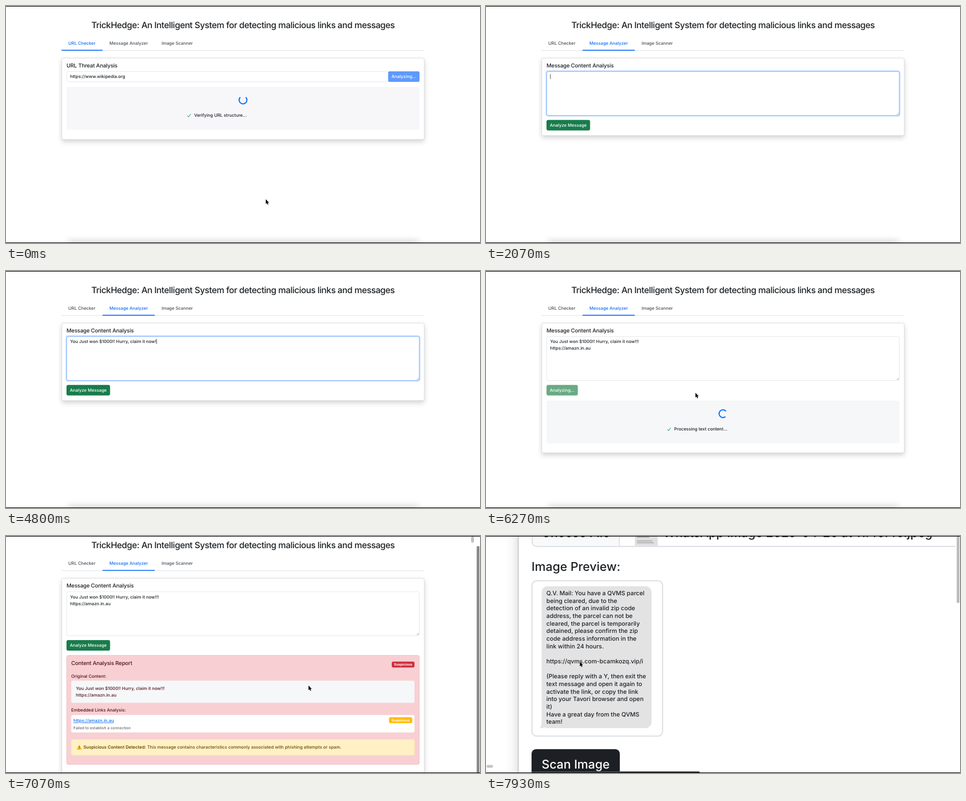
An HTML page that plays this animation: 854 px wide and 428 px high, repeating every 8000 ms.

```html
<!DOCTYPE html>
<html lang="en">
<head>
<meta charset="utf-8">
<title>Threat analysis demo</title>
<style>
  html, body { margin: 0; width: 100%; height: 100%; overflow: hidden; background: #fff; }
  svg { display: block; }
  text { font-family: Inter, Roboto, sans-serif; white-space: pre; text-rendering: geometricPrecision; }
  .card { fill: #fff; stroke: #cfcfcf; stroke-width: .7; filter: drop-shadow(0 4px 4px rgba(0, 0, 0, .17)); }
  .field { fill: #fff; stroke: #dee2e6; stroke-width: .8; }
  .glow { fill: none; stroke: #c2daff; stroke-width: 2.4; }
  .haze { opacity: .15; filter: blur(6px); }
</style>
</head>
<body>
<svg id="stage" width="854" height="428" viewBox="0 0 854 428"></svg>
<script>
const LOOP = 8000, SPIN = 596;
const INK = '#1c2024', BLUE = '#0d6efd', GREEN = '#187c4b', WINE = '#4d1218';
const T_MESSAGE = 2070, T_ANALYZE = 6000, T_REPORT = 6600, T_IMAGE = 7330;

const stage = document.getElementById('stage');

function el(parent, tag, attrs = {}) {
  const node = document.createElementNS('http://www.w3.org/2000/svg', tag);
  for (const key in attrs) node.setAttribute(key, attrs[key]);
  return parent.appendChild(node);
}
const group = parent => el(parent, 'g');
const rect = (parent, x, y, width, height, fill, rx = 3, more = {}) =>
  el(parent, 'rect', { x, y, width, height, fill, rx, ...more });
const styled = (parent, cls, x, y, width, height, rx = 3) =>
  el(parent, 'rect', { class: cls, x, y, width, height, rx });

function text(parent, x, y, str, { size = 7.85, weight = 450, fill = INK, anchor = 'start', spacing = 0 } = {}) {
  const node = el(parent, 'text', {
    x, y, fill, 'font-size': size, 'font-weight': weight,
    'text-anchor': anchor, 'letter-spacing': spacing
  });
  node.textContent = str;
  return node;
}
const heading = (parent, x, y, str, fill = INK) =>
  text(parent, x, y, str, { size: 9.8, weight: 550, spacing: -.15, fill });
const label = (parent, y, str) => text(parent, 117.5, y, str, { weight: 550, fill: WINE });

function button(parent, x, y, w, str, fill, rx = 3) {
  const g = group(parent);
  rect(g, x, y, w, 19, fill, rx);
  text(g, x + w / 2, y + 12.4, str, { fill: '#fff', anchor: 'middle' });
  return g;
}

function badge(parent, x, y, w, str, fill) {
  rect(parent, x, y, w, 10.8, fill, 3);
  text(parent, x + w / 2, y + 7.6, str, { size: 6.1, weight: 700, fill: '#fff', anchor: 'middle' });
}

function progress(parent, y, str) {
  const g = group(parent);
  const back = rect(g, 109, y, 636, 77.5, '#f7f7fa');
  const arc = el(g, 'path', {
    d: 'M4.95 4.95A7 7 0 1 1 4.95 -4.95', fill: 'none', stroke: BLUE, 'stroke-width': 2
  });
  el(g, 'path', {
    d: `M326.8 ${y + 52}l2 2.4 4-5.4`, fill: 'none', stroke: '#198754', 'stroke-width': 1
  });
  text(g, 339, y + 54.3, str);
  const turn = deg => arc.setAttribute('transform', `translate(427 ${y + 23.7}) rotate(${deg})`);
  return { g, back, turn };
}

// Page frame
const page = group(stage);
text(page, 427, 39.8, 'TrickHedge: An Intelligent System for detecting malicious links and messages',
  { size: 15.6, weight: 550, anchor: 'middle', spacing: -.41 });
rect(page, 100, 80, 654, .8, '#d9dde1', 0);
const tabs = [['URL Checker', 100, 74], ['Message Analyzer', 174, 94], ['Image Scanner', 268, 81]]
  .map(([name, x, w]) => ({
    name: text(page, x + 12.3, 70.2, name, { weight: 500 }),
    line: rect(page, x, 79, w, 1.6, BLUE, 0)
  }));
const panels = tabs.map(() => group(page));

// URL checker
const [urlPanel, msgPanel, imgPanel] = panels;
styled(urlPanel, 'card', 100.4, 94, 653.2, 147);
heading(urlPanel, 109, 111, 'URL Threat Analysis');
styled(urlPanel, 'field', 109.4, 118.4, 580, 18.4);
text(urlPanel, 115.5, 130.3, 'https://www.wikipedia.org');
button(urlPanel, 688.5, 118, 56.5, 'Analyzing...', '#5f99fe', 2.5);
const urlWork = progress(urlPanel, 146, 'Verifying URL structure...');

// Message analyzer
const MESSAGE = 'You Just won $1000!! Hurry, claim it now!!!\nhttps://amazn.in.au';
const [WIN, LINK] = MESSAGE.split('\n');
const msgCard = styled(msgPanel, 'card', 100.4, 94, 653.2, 140);
heading(msgPanel, 109, 111, 'Message Content Analysis');
styled(msgPanel, 'field', 109.4, 118.4, 635.2, 79.4);
const focus = group(msgPanel);
styled(focus, 'glow', 108.6, 117.4, 636.8, 81, 3.6);
rect(focus, 109.4, 118.4, 635.2, 79.4, 'none', 3, { stroke: '#86b7fe', 'stroke-width': .8 });
const caret = rect(focus, 0, 0, .7, 9, '#111', 0);
el(msgPanel, 'path', { d: 'M740 196.5l3.6-3.6M742 196.5l1.6-1.6', stroke: '#777', 'stroke-width': .6 });
const typed = [130.3, 142.3].map(y => text(msgPanel, 115.5, y, ''));
const idleButton = button(msgPanel, 109, 205.8, 78.5, 'Analyze Message', GREEN);
const busyButton = button(msgPanel, 109, 205.8, 56.5, 'Analyzing...', '#69ab84');
const msgWork = progress(msgPanel, 234, 'Processing text content...');
msgWork.back.setAttribute('fill', '#f6f7f9');

const PINK = { stroke: '#f0b4ba', 'stroke-width': .7 };
const report = group(msgPanel);
rect(report, 109.3, 233.3, 635.4, 197, '#f8d0d3', 3, PINK);
heading(report, 117.5, 251.2, 'Content Analysis Report', WINE);
badge(report, 695, 244.5, 41, 'Suspicious', '#d03040');
label(report, 273.4, 'Original Content:');
rect(report, 117.5, 279, 618.5, 40, '#f6f7f9');
text(report, 126, 296, WIN, { fill: WINE });
text(report, 126, 308, LINK, { fill: WINE });
label(report, 334.6, 'Embedded Links Analysis:');
rect(report, 117.5, 341, 618.5, 31.5, '#fff');
text(report, 121.5, 353.6, LINK, { fill: BLUE }).setAttribute('text-decoration', 'underline');
text(report, 121.5, 366.8, 'Failed to establish a connection', { size: 6.87, fill: '#6a6468' });
badge(report, 690, 345, 42, 'Suspicious', '#ffbd07');
rect(report, 117.5, 385, 618.5, 28.6, '#fff0c6', 3, { stroke: '#ffe69c', 'stroke-width': .7 });
el(report, 'path', {
  d: 'M132 395.3l4.3 7.6h-8.6z', fill: '#ffc31f', stroke: '#ffc31f', 'stroke-width': 1, 'stroke-linejoin': 'round'
});
el(report, 'path', { d: 'M132 397.4v2.9M132 401.2v1', stroke: '#3b2b00', 'stroke-width': .9 });
const warning = text(report, 139.5, 402.2, '', { fill: '#664d03' });
const strong = el(warning, 'tspan', { 'font-weight': 600 });
strong.textContent = 'Suspicious Content Detected:';
el(warning, 'tspan').textContent =
  ' This message contains characteristics commonly associated with phishing attempts or spam.';

// Image scanner
const SMS = `Q.V. Mail: You have a QVMS parcel
being cleared, due to the
detection of an invalid zip code
address, the parcel can not be
cleared, the parcel is temporarily
detained, please confirm the zip
code address information in the
link within 24 hours.

https://qvms.com-bcamkozq.vip/i

(Please reply with a Y, then exit the
text message and open it again to
activate the link, or copy the link
into your Tavori browser and open
it)
Have a great day from the QVMS
team!`.split('\n');
const words = SMS.filter(Boolean).join(' ');
const cuts = [0, words.indexOf('detained'), words.indexOf('message and'), words.length];

styled(imgPanel, 'card', 100.4, 94, 653.2, 460);
heading(imgPanel, 109, 111, 'Image Content Scanner');
text(imgPanel, 109, 126.4, 'Upload suspicious image:');
styled(imgPanel, 'field', 109.4, 134.2, 635.2, 18.2);
rect(imgPanel, 109.8, 134.6, 55.6, 17.4, '#f8f9fa', 2.6);
rect(imgPanel, 165.3, 134.4, .7, 17.8, '#dee2e6', 0);
text(imgPanel, 115.5, 146.4, 'Choose File');
rect(imgPanel, 175.7, 135.4, 14.8, 16.6, '#e0e0e1', .5);
for (let i = 0; i < 12; i++)
  if (i % 5 !== 4) rect(imgPanel, 177, 136.6 + i * 1.2, 8 + i * 5 % 4, .45, '#9a9a9c', 0);
text(imgPanel, 194, 146.4, 'WhatsApp Image 2025-04-26 at 11.40.46.jpeg');
text(imgPanel, 109, 168.4, 'Image Preview:', { weight: 500 });
styled(imgPanel, 'field', 109.3, 174.6, 84.3, 100.6);
rect(imgPanel, 115.5, 178.2, 71, 91.8, '#e3e3e4', 4);
el(imgPanel, 'path', { d: 'M115.5 265.5q0 3-1.2 4.4 2.6.3 4.6-1.2z', fill: '#e3e3e4' });
SMS.forEach((line, i) => text(imgPanel, 118.6, 184 + i * 4.9, line, { size: 3.85 }));
button(imgPanel, 109, 283.6, 57, 'Scan Image', INK);
rect(imgPanel, 109.3, 311.2, 635.4, 230, '#f8d0d3', 3, PINK);
heading(imgPanel, 117.5, 329.6, 'Image Scan Report', WINE);
badge(imgPanel, 665.5, 322.3, 70.5, 'Suspicious Content', '#d03040');
label(imgPanel, 351.3, 'Extracted Text:');
rect(imgPanel, 117.5, 357, 618.5, 49, '#f6f7f9');
for (let i = 0; i < 3; i++)
  text(imgPanel, 125.6, 373.6 + i * 12.1, words.slice(cuts[i], cuts[i + 1]).trim(), { fill: WINE });

// Window overlay
const haze = rect(stage, 112, 423, 632, 20, '#000', 0, { class: 'haze' });
const track = rect(stage, 846, 0, 8, 428, '#fff', 0);
const pageThumb = rect(stage, 848, 18, 5, 410, '#8a8a8a', 2.5);
const boxThumb = rect(stage, 838, 1, 5, 11, '#c0c0c0', 2.5);
const sideBars = group(stage);
rect(sideBars, 82, 425, 303, 3, '#4a4a4a', 1.5);
rect(sideBars, 1, 413.5, 11.5, 5, '#c4c4c4', 2.5);
const pointer = el(stage, 'path', {
  d: 'M0 0V8.4L1.9 6.7 3.2 9.8 4.7 9.1 3.4 6.2H6Z',
  fill: '#000', stroke: '#fff', 'stroke-width': 1, 'paint-order': 'stroke'
});
rect(stage, 0, 0, 854, 1, '#000', 0);
rect(stage, 0, 427, 854, 1, '#000', 0);

// Motion tables: time, then values
const KEYS = [[2070, 0], [2870, 13], [3000, 14], [3070, 16], [3300, 18], [3800, 20], [3870, 21],
  [4130, 27], [4270, 28], [5070, 49], [5130, 50], [5930, 63]];
const PATH = [[6000, 160, 215], [6270, 377, 220], [6530, 470, 246], [6800, 545, 270],
  [7130, 545, 270], [7330, 400, 200], [7600, 169, 227]];
const ZOOM = [[7670, 1, 404], [7730, 1.196, 338], [7800, 1.62, 262], [7870, 2.2, 184], [7930, 2.79, 121]];
const SCROLL = [[6670, 0], [6800, 17.7]];

function at(table, t) {
  const next = table.findIndex(row => row[0] > t);
  if (next === 0) return table[0].slice(1);
  if (next < 0) return table[table.length - 1].slice(1);
  const a = table[next - 1], b = table[next], k = (t - a[0]) / (b[0] - a[0]);
  return a.slice(1).map((v, i) => v + (b[i + 1] - v) * k);
}
const show = (node, on) => { node.style.display = on ? '' : 'none'; };
const angle = (t, from, start) => start + (t - from) / SPIN * 360;

function drawMessage(t) {
  const busy = t >= T_ANALYZE && t < T_REPORT, done = t >= T_REPORT;
  msgCard.setAttribute('height', done ? 354 : busy ? 234.5 : 140);
  const lines = MESSAGE.slice(0, Math.floor(at(KEYS, t)[0])).split('\n');
  typed.forEach((node, i) => { node.textContent = lines[i] || ''; });
  const row = lines.length - 1;
  const width = lines[row] ? typed[row].getComputedTextLength() : 0;
  caret.setAttribute('x', 115.7 + width);
  caret.setAttribute('y', 122.8 + row * 12);
  show(focus, t < T_ANALYZE);
  show(idleButton, !busy);
  show(busyButton, busy);
  show(msgWork.g, busy);
  show(report, done);
  msgWork.turn(angle(t, 6270, 5));
}

function draw(t) {
  const tab = t < T_MESSAGE ? 0 : t < T_IMAGE ? 1 : 2;
  tabs.forEach(({ name, line }, i) => {
    name.setAttribute('fill', i === tab ? BLUE : '#495057');
    show(line, i === tab);
    show(panels[i], i === tab);
  });

  if (tab === 0) {
    urlWork.turn(angle(Math.min(t, 1530), 0, -90));
    urlWork.back.setAttribute('fill', t < 930 ? '#f7f7fa' : '#f4f7fa');
  }
  if (tab === 1) drawMessage(t);

  const [scale, thumb] = at(ZOOM, t);
  const scroll = tab === 1 ? at(SCROLL, t)[0] : 0;
  const dx = scale < 1.196 ? 168 * (1 - scale) : -33 - 118.6 * (scale - 1.196);
  const dy = 227 * (1 - scale) - scroll;
  page.setAttribute('transform', `translate(${dx} ${dy}) scale(${scale})`);

  show(track, tab === 2);
  show(pageThumb, scroll > 0 || tab === 2);
  show(boxThumb, scroll > 0);
  show(sideBars, scale > 2.5);
  show(haze, tab < 2 && !scroll);
  pageThumb.setAttribute('y', tab === 2 ? 0 : 18);
  pageThumb.setAttribute('height', tab === 2 ? thumb : 410);
  pageThumb.setAttribute('fill', tab === 2 ? '#bdbdbd' : '#8a8a8a');

  show(pointer, tab === 0 || t >= T_ANALYZE);
  const [x, y] = tab === 0 ? [468, 349] : at(PATH, t);
  pointer.setAttribute('transform', `translate(${x} ${y})`);
}

const begin = performance.now();
function tick() {
  draw((performance.now() - begin) % LOOP);
  requestAnimationFrame(tick);
}
tick();
</script>
</body>
</html>
```
